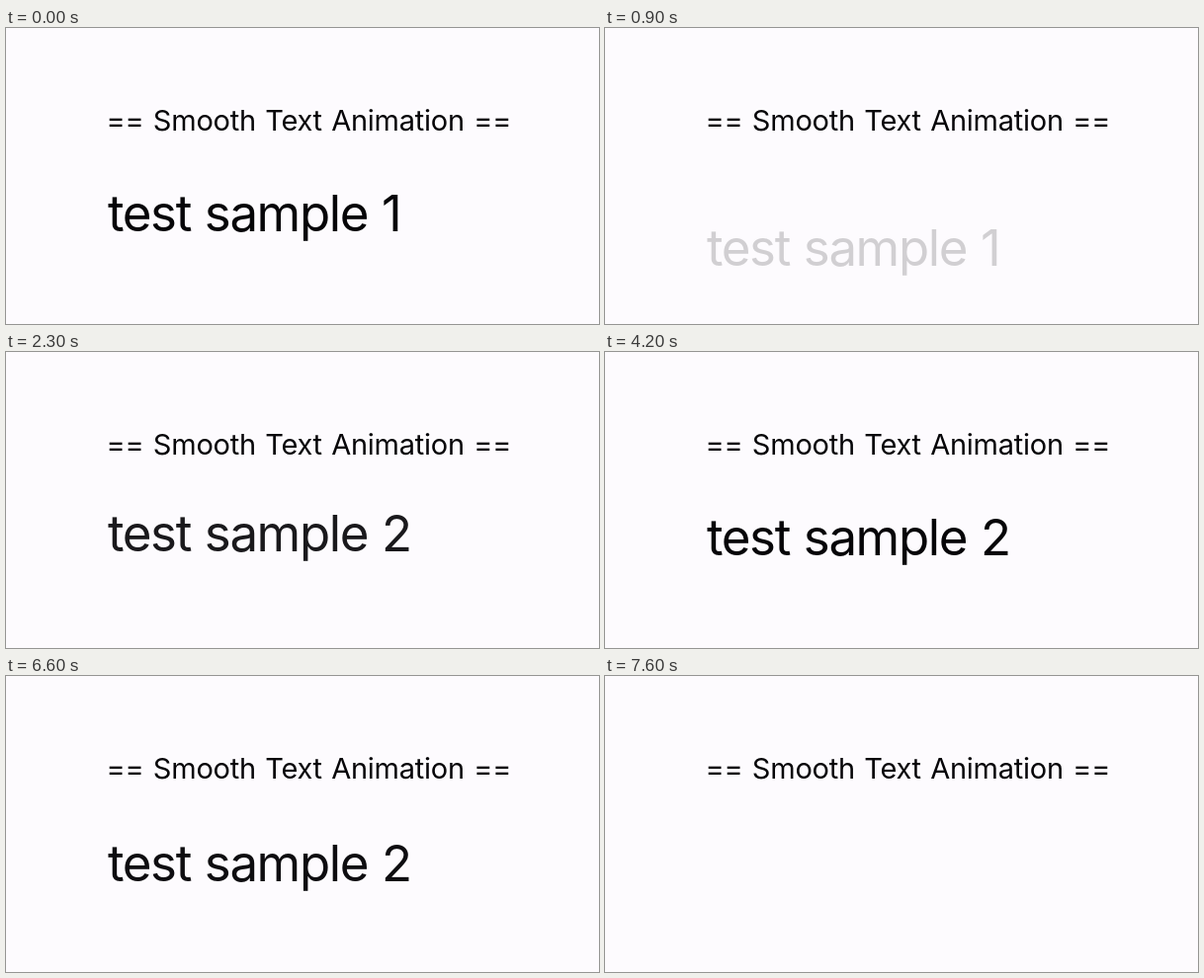
Animation, 600 px wide and 300 px high, one loop 8 s. Source, as an HTML page:

```html
<!DOCTYPE html>
<html lang="en">
<head>
<meta charset="utf-8">
<title>Smooth text</title>
<style>
html, body { margin: 0; width: 100%; height: 100%; overflow: hidden; background: #fdfbfe; }
svg { display: block; width: 600px; height: 300px; }
text { font-family: Inter, Roboto, sans-serif; font-weight: 380; fill: #060508; white-space: pre; }
#title { font-size: 29px; letter-spacing: -0.25px; word-spacing: 1.5px; }
#line { font-size: 51px; letter-spacing: -1.4px; word-spacing: 1px; }
</style>
</head>
<body>
<svg viewBox="0 0 600 300">
  <text id="title" x="101.6" y="103.8">== Smooth Text Animation ==</text>
  <text id="line" x="103" y="206"></text>
</svg>
<script>
const LOOP = 8000, STEP = 100, SHIFT = 42;
const line = document.getElementById('line');

// Linear slides: from and to are offsets in units of SHIFT
const moves = [
  { text: 'test sample 1', start: 188, length: 860, from: 0, to: 1 },
  { text: 'test sample 2', start: 1485, length: 890, from: -1, to: 0 },
  { text: 'test sample 2', start: 6570, length: 830, from: 0, to: 1 },
];

function draw(now) {
  const t = Math.floor((now % LOOP) / STEP) * STEP;
  const move = moves.filter(m => t >= m.start).pop() || moves[0];
  const p = Math.min(1, Math.max(0, (t - move.start) / move.length));
  const pos = move.from + (move.to - move.from) * p;
  line.textContent = move.text;
  line.setAttribute('transform', `translate(0 ${(pos * SHIFT).toFixed(2)})`);
  line.setAttribute('opacity', 1 - Math.abs(pos));
}

const begin = performance.now();
function tick() {
  draw(performance.now() - begin);
  requestAnimationFrame(tick);
}
tick();
</script>
</body>
</html>
```
